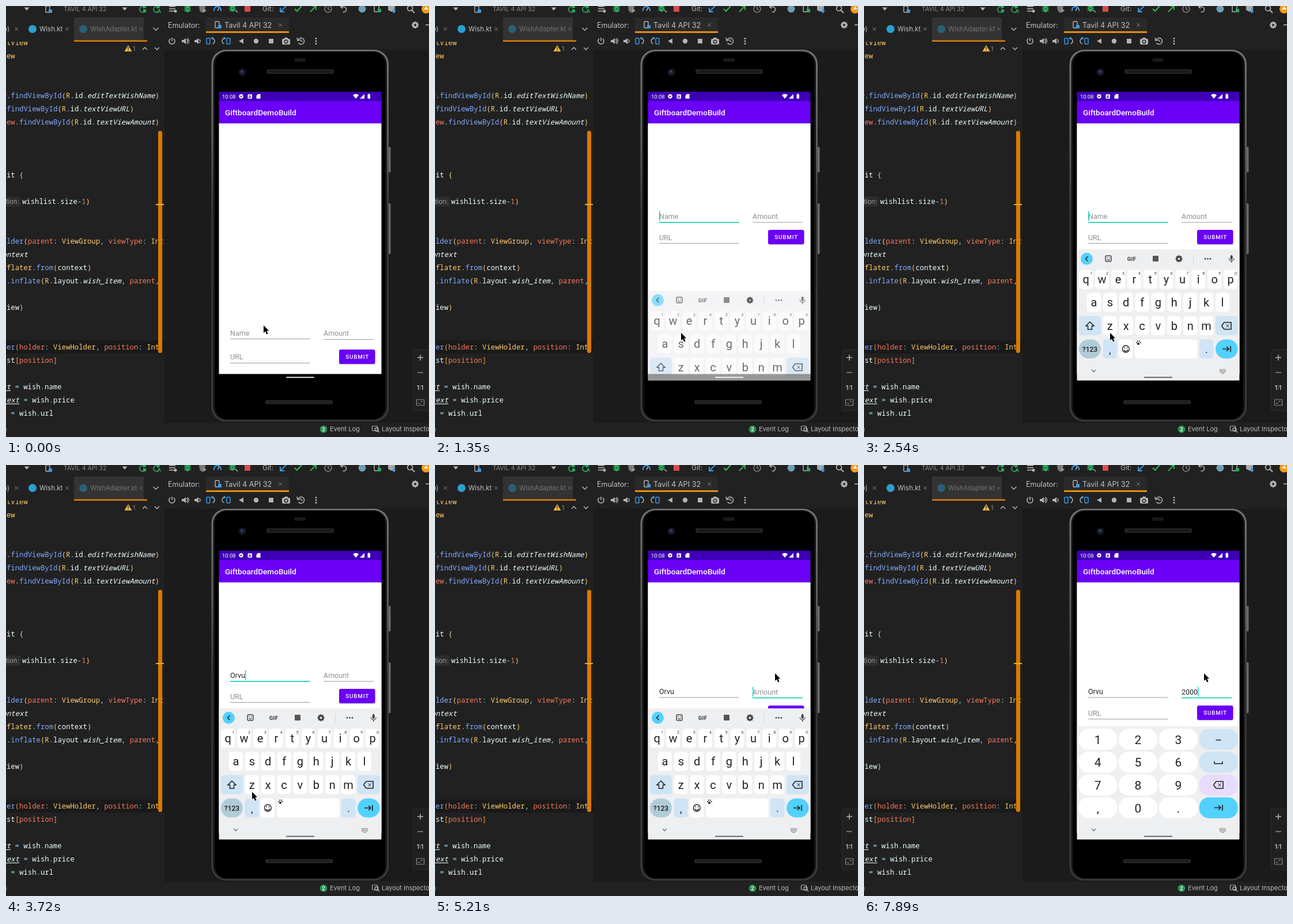
These frames come from a looping animation (734x749 px, 8 s). An HTML page with a canvas:

```html
<!DOCTYPE html>
<html lang="en">
<head>
<meta charset="utf-8">
<title>Wishlist emulator</title>
<style>
html, body { margin: 0; width: 100%; height: 100%; overflow: hidden; background: #1b1b1b; }
canvas { display: block; }
</style>
</head>
<body>
<canvas id="stage" width="734" height="749"></canvas>
<script>
const W = 734, H = 749, LOOP = 8000;
const stage = document.getElementById('stage').getContext('2d');
const backdrop = document.createElement('canvas');
backdrop.width = W;
backdrop.height = H;
let c = backdrop.getContext('2d');

const UI = 'Inter, sans-serif', ROBOTO = 'Roboto, sans-serif', MONO = '"Noto Sans Mono", monospace';
const ORANGE = '#f49810', TEAL = '#16d3bb', PURPLE = '#6a00f6', INK = '#202124';
const GREY = '#b4b4b4', GREEN = '#2eaa5c', BLUE = '#3b9be8';

// ---- drawing helpers ----
function rect(x, y, w, h, fill, r = 0) {
  c.fillStyle = fill;
  c.beginPath();
  c.roundRect(x, y, w, h, r);
  c.fill();
}
function frame(x, y, w, h, color, lw = 1.3, r = 0) {
  c.strokeStyle = color;
  c.lineWidth = lw;
  c.beginPath();
  c.roundRect(x, y, w, h, r);
  c.stroke();
}
function dot(x, y, r, fill) {
  c.fillStyle = fill;
  c.beginPath();
  c.arc(x, y, r, 0, 7);
  c.fill();
}
function arc(x, y, r, color, lw = 1.5, from = 0, to = 2) {
  c.strokeStyle = color;
  c.lineWidth = lw;
  c.beginPath();
  c.arc(x, y, r, from * Math.PI, to * Math.PI);
  c.stroke();
}
function trace(x, y, pts) {
  c.beginPath();
  for (let i = 0; i < pts.length; i += 2) c.lineTo(x + pts[i], y + pts[i + 1]);
}
function line(x, y, pts, color, lw = 1.5) {
  trace(x, y, pts);
  c.strokeStyle = color;
  c.lineWidth = lw;
  c.stroke();
}
function poly(x, y, pts, fill) {
  trace(x, y, pts);
  c.fillStyle = fill;
  c.fill();
}
// Text whose capitals are centred on y
function text(s, x, y, size, color, font = UI, weight = 400, align = 'left', space = 0) {
  c.font = `${weight} ${size}px ${font}`;
  c.letterSpacing = space + 'px';
  c.textAlign = align;
  c.fillStyle = color;
  c.fillText(s, x, y + size * 0.36);
  c.letterSpacing = '0px';
}
const cross = (x, y, color = '#808080', r = 3) => {
  line(x, y, [-r, -r, r, r], color, 1);
  line(x, y, [-r, r, r, -r], color, 1);
};
const chevron = (x, y, color, d = 1, r = 4) => line(x, y, [-r, -d * r / 2, 0, d * r / 2, r, -d * r / 2], color, 1.5);
function gear(x, y, r, color) {
  for (let i = 0; i < 4; i++) {
    const a = i * Math.PI / 4, p = Math.cos(a) * r, q = Math.sin(a) * r;
    line(x, y, [-p, -q, p, q], color, r * 0.45);
  }
  arc(x, y, r * 0.55, color, r * 0.5);
  dot(x, y, r * 0.32, c.gearHole || '#212121');
}
function bug(x, y) {
  for (const d of [-3.5, 0, 3.5]) line(x, y, [-6, d, 6, d], GREEN, 1.4);
  c.fillStyle = GREEN;
  c.beginPath();
  c.ellipse(x, y, 4, 6, 0, 0, 7);
  c.fill();
  line(x, y, [-2, 0, 2, 0], '#212121', 1);
}
function phoneIcon(x, y, color = GREY) {
  frame(x - 4, y - 6, 7, 11, color, 1.4, 1);
  rect(x + 1, y, 6, 6, BLUE, 1);
}

// ---- code editor ----
const COL = { b: '#82aaff', y: '#ffcb6b', w: '#eeffff', i: '#eeffff', u: '#eeffff', r: '#f7785c', p: '#89ddff', g: '#c3e88d', o: '#f0a13c' };
const CH = 7.368;
function code(x, y, ...parts) {
  for (const part of parts) {
    const kind = part[0], s = part.slice(2), w = s.length * CH;
    const style = 'iu'.includes(kind) ? 'italic 400' : 400;
    text(s, x, y, 12.28, COL[kind], MONO, style);
    if (kind === 'u') rect(x, y + 6, w, 1, COL.u);
    x += w;
  }
}
function find(x, y, owner, id) {
  code(x - (owner.length + 1) * CH, y, 'r:' + owner, 'p:.', 'b:findViewById', 'y:(R', 'p:.', 'w:id', 'p:.', 'i:' + id, 'y:)');
}
function drawEditor() {
  rect(0, 0, 275, H, '#212121');
  rect(0, 581, 275, 23, '#1a1a1a');
  c.save();
  c.beginPath();
  c.rect(0, 62, 274, 662);
  c.clip();
  code(-6.4, 64, 'y:xtView');
  code(-6.4, 87, 'y:iew');
  find(8.3, 156, 'w', 'editTextWishName');
  find(1, 179, '', 'textViewURL');
  find(23, 202, 'ew', 'textViewAmount');
  code(1, 294, 'w:it ', 'g:{');
  rect(-5, 331, 31, 18, '#2d2d2d', 4);
  text('tion:', 0, 340, 11, '#9a9a9a');
  code(28, 340, 'w:wishlist', 'p:.', 'w:size', 'p:-', 'r:1', 'y:)');
  code(1, 409, 'b:lder', 'y:(', 'r:parent', 'p:: ', 'y:ViewGroup', 'p:, ', 'r:viewType', 'p:: ', 'y:Int');
  code(-6.4, 432, 'i:ontext');
  code(1, 455, 'y:flater', 'p:.', 'b:from', 'y:(', 'w:context', 'y:)');
  code(1, 478, 'p:.', 'b:inflate', 'y:(R', 'p:.', 'w:layout', 'p:.', 'i:wish_item', 'p:, ', 'r:parent', 'p:,');
  code(-6.4, 524, 'w:View', 'y:)');
  code(1, 593, 'b:er', 'o:(', 'r:holder', 'p:: ', 'y:ViewHolder', 'p:, ', 'r:position', 'p:: ', 'y:Int', 'o:)');
  code(1, 616, 'w:st', 'o:[', 'r:position', 'o:]');
  code(-14, 662, 'u:ext', 'p: = ', 'w:wish', 'p:.', 'w:name');
  code(-6.4, 685, 'u:text', 'p: = ', 'w:wish', 'p:.', 'w:price');
  code(-6.4, 708, 'r:r', 'p: = ', 'w:wish', 'p:.', 'w:url');
  c.restore();
  rect(264, 217, 7, 386, '#d97900', 3);
  rect(260, 344, 14, 2, '#e8b02c');

  // tabs
  text('o)', -5, 40, 12, GREY);
  cross(18, 40);
  dot(46, 40, 7, '#2a9fd0');
  text('Wish.kt', 58, 40, 11.5, '#c4c4c4');
  cross(106, 40);
  rect(118, 20, 121, 40, '#333333');
  rect(118, 59.5, 127, 2.5, '#e07f08');
  dot(134, 40, 7, '#2b5f75');
  text('WishAdapter.kt', 146, 40, 11.3, '#747474');
  cross(234, 40, '#666');
  chevron(260, 40, GREY, 1, 4.5);
  poly(212, 74, [0, -6, 6.5, 5, -6.5, 5], '#f0b83c');
  rect(211.3, 71, 1.5, 4, '#333');
  rect(211.3, 76, 1.5, 1.5, '#333');
  text('1', 220, 74, 11, '#8a8a8a');
  chevron(241, 74, GREY, -1);
  chevron(262, 74, GREY);
}

// ---- IDE chrome ----
function rerun(x, letter) {
  arc(x, 6, 5, GREEN, 1.7, 0.1, 1.6);
  poly(x, 0, [1, -2, 7, 2, 1, 5], GREEN);
  if (letter) text('A', x + 5, 9, 9, GREEN, UI, 600, 'center');
  else rect(x + 1, 6, 5, 5, GREEN);
}
function drawToolbar() {
  rect(0, 0, W, 20, '#212121');
  for (const x of [36, 206]) poly(x, 5, [-4.5, -2.5, 4.5, -2.5, 0, 3], GREY);
  phoneIcon(73, 6);
  text('TAVIL 4 API 32', 100, 5, 10.6, '#8c8c8c');
  rerun(237);
  rerun(261, true);
  for (const d of [0, 4, 8]) rect(283, d, 11, 1.6, GREY);
  dot(294, 9, 2.5, GREY);
  bug(315, 5);
  poly(341, 5, [-6, -6, 5, -6, 4, 3, -1, 7, -5, 3], '#777');
  poly(344, 7, [-2, -3, 4, 1, -2, 5], '#999');
  arc(367, 7, 6, BLUE, 2, 0.9, 2.1);
  line(367, 7, [0, 1, 3, -4], GREY);
  bug(393, 4);
  line(398, 6, [4, 5, 0, 1], GREY);
  rect(414, 0, 10, 10, '#db4b4b');
  text('Git:', 445, 5, 12, GREY);
  line(481, 5, [6, -6, -5, 5], BLUE, 1.8);
  line(481, 5, [-5, -2, -5, 5, 2, 5], BLUE, 1.8);
  line(507, 5, [-6, 0, -2, 4, 6, -5], '#35b94c', 2);
  line(533, 5, [-5, 5, 5, -5], '#35b94c', 1.8);
  line(533, 5, [-2, -5, 5, -5, 5, 2], '#35b94c', 1.8);
  arc(559, 5, 6, '#858585');
  line(559, 5, [0, -4, 0, 0, 3, 2], '#858585');
  arc(586, 6, 4.5, GREY, 1.6, 1.5, 2.6);
  line(584, 1.5, [2, 0, -4, 0], GREY, 1.6);
  line(582, 1.5, [2, -3, -1, 0, 2, 3], GREY);
  dot(618, 5, 6.5, '#6f9db4');
  frame(639, -2, 8, 12, GREY, 1.4, 1);
  rect(645, 5, 6, 6, GREEN);
  poly(669, 4, [-6, -4, 0, -7, 6, -4, 6, 3, 0, 6, -6, 3], '#a8a8a8');
  line(673, 7, [0, -5, 0, 4], BLUE, 2);
  poly(673, 9, [-4, -1, 4, -1, 0, 4], BLUE);
  arc(701, 4, 4.5, GREY, 1.7);
  line(704, 7, [0, 0, 5, 5], GREY, 2);
  dot(729, 5, 8, '#f59a1c');
  poly(729, 5, [0, -4, 4, 1, -4, 1], '#fff');
}
function speaker(x, y, loud) {
  poly(x, y, [-5, -2, -2, -2, 2, -5, 2, 5, -2, 2, -5, 2], GREY);
  arc(x + 2, y, 3, GREY, 1.3, -0.4, 0.4);
  if (loud) arc(x + 2, y, 5.5, GREY, 1.3, -0.35, 0.35);
}
function drawEmulatorPanel() {
  rect(275, 0, W - 275, H, '#1b1b1b');
  rect(275, 20, W - 275, 56, '#212121');
  text('Emulator:', 281, 33, 12.5, '#c0c0c0');
  rect(347, 20, 144, 25, '#2a2a2a');
  rect(347, 44, 144, 2.8, ORANGE);
  phoneIcon(367, 33);
  text('Tavil 4 API 32', 379, 33, 12.7, '#c0c0c0');
  cross(476, 33);
  gear(710, 33, 6, GREY);
  rect(728, 32, 6, 1.6, GREY);

  const y = 61;
  arc(288, y, 5, GREY, 1.6, -0.3, 1.3);
  line(288, y, [0, -6, 0, 0], GREY, 1.6);
  speaker(310, y, true);
  speaker(332, y);
  for (const [x, d] of [[355, 1], [382, -1]]) {
    frame(x - d * 4 - 3, y - 5, 6, 10, BLUE, 1.5, 1);
    arc(x + d * 2, y, 5, GREY, 1.5, d > 0 ? -0.4 : 0.6, d > 0 ? 0.4 : 1.4);
    dot(x + d * 3, y - 5, 2, BLUE);
  }
  poly(408, y, [-4, 0, 4, -4.5, 4, 4.5], GREY);
  dot(434, y, 4.2, GREY);
  rect(456, y - 4, 8, 8, GREY);
  rect(479, y - 4, 14, 10, GREY, 2);
  rect(483, y - 6, 6, 4, GREY, 1);
  arc(486, y + 1, 2.8, '#212121', 1.4);
  arc(512, y, 5.5, GREY, 1.5, -0.9, 0.8);
  line(507, y - 3, [-2, -3, -1, 2, 4, 1], GREY);
  line(512, y, [0, -3, 0, 0, 3, 1], GREY, 1.3);
  for (const d of [-4.5, 0, 4.5]) dot(538, y + d, 1.5, GREY);

  rect(706, 597, 32, 107, '#202020', 3);
  frame(706.5, 597.5, 32, 106, '#2c2c2c', 1, 3);
  line(719, 611, [-5, 0, 5, 0], GREY);
  line(719, 611, [0, -5, 0, 5], GREY);
  line(719, 637, [-5, 0, 5, 0], '#8a8a8a');
  text('1:1', 718.5, 663, 10, '#c8c8c8', UI, 600, 'center');
  frame(712.5, 684, 13, 10, '#8a8a8a', 1.2);
  line(719, 689, [-3, 0, -3, 2, 0, 2], '#8a8a8a', 1);
  line(719, 689, [0, -2, 3, -2, 3, 0], '#8a8a8a', 1);
}
function drawStatusBar() {
  rect(0, 724, W, 25, '#212121');
  text('n', -5, 735, 11, GREY);
  dot(551, 735.5, 6.5, '#23924f');
  text('2', 551, 735.5, 9.5, '#fff', UI, 600, 'center');
  text('Event Log', 562, 735.5, 11, '#bcbcbc');
  frame(635.5, 730, 9, 8, GREY, 1.2, 1);
  arc(643, 736, 3, GREY, 1.3);
  line(645, 738, [0, 0, 3, 3], GREY);
  text('Layout Inspector', 652, 735.5, 11, '#bcbcbc');
}
function drawPhone() {
  rect(662, 245, 5.5, 44, '#6a6a6a', 1.5);
  rect(662, 343, 5.5, 88, '#6a6a6a', 1.5);
  const edge = c.createLinearGradient(0, 76, 0, 722);
  edge.addColorStop(0, '#747474');
  edge.addColorStop(0.25, '#5e5e5e');
  edge.addColorStop(0.45, '#363636');
  edge.addColorStop(1, '#3c3c3c');
  rect(356.5, 76, 307.5, 646, edge, 25);
  rect(359.5, 78.5, 301.5, 641, '#161616', 23);
  rect(362.5, 80, 295.5, 638, '#000', 21);
  rect(500, 91, 20, 6, '#191919', 3);
  rect(452, 110, 117, 8, '#242424', 3);
  rect(456, 112, 109, 4, '#191919', 2);
  dot(410, 115, 6.5, '#16181f');
  dot(410, 115, 3.5, '#1d2545');
  dot(409, 114, 1.3, '#5064a0');
  rect(450, 685, 117, 7, '#282828', 3);
  rect(454, 687, 109, 3, '#1c1c1c', 1);

  rect(369.5, 149, 282, 16, '#3d00b4');
  rect(369.5, 165, 282, 39, PURPLE);
  rect(369.5, 204, 282, 435.5, '#fff');
  text('10:08', 375, 157.5, 9.5, '#fff', ROBOTO);
  c.gearHole = '#3d00b4';
  gear(408, 157, 4, '#fff');
  c.gearHole = '';
  rect(419.5, 153.5, 7.5, 7.5, '#fff', 1);
  text('A', 423.2, 157.3, 7, '#3d00b4', ROBOTO, 700, 'center');
  poly(438, 157, [-1, -4, 3.5, -4, 3.5, 4, -3.5, 4, -3.5, -1], '#fff');
  poly(607, 157, [0, 4, -5, -2, -2, -4, 2, -4, 5, -2], '#fff');
  poly(618, 157, [4, -4, 4, 4, -4, 4], '#fff');
  rect(627.5, 153.5, 4.5, 7.5, '#fff', 0.8);
  rect(628.7, 152.5, 2, 2, '#fff');
  text('GiftboardDemoBuild', 380, 185, 13.6, '#fff', ROBOTO, 500);
}

// ---- app screen ----
function field(s, hint, x, y, w, lineY, focused, caret) {
  text(s || hint, x, y, 12.5, s ? '#222' : '#8f8f8f', ROBOTO);
  const end = s ? c.measureText(s).width : 0;
  if (focused) rect(x, lineY - 0.8, w, 1.7, TEAL);
  else rect(x, lineY - 0.5, w, 1, '#9a9a9a');
  if (caret) rect(x + end, y - 8.5, 1.5, 17, TEAL);
}
function drawForm(s) {
  const [ny, nl, al, uy, ul, by] = {
    low: [568, 578.5, 579.5, 609.5, 620.5, 597],
    high: [365, 376, 376, 402, 412.5, 389],
    mid: [393.5, 404, 404.5, 431, 441.5, 418]
  }[s.layout];
  field(s.name, 'Name', 389, ny, 138.5, nl, s.focus === 'name', s.focus === 'name' && s.caret);
  field(s.amount, 'Amount', 551, ny + 0.5, 87, al, s.focus === 'amount', s.focus === 'amount' && s.caret);
  field('', 'URL', 389, uy, 138.5, ul);
  rect(578, by + 1, 62.5, 25.2, '#c9c9c9', 3);
  rect(578, by, 62.5, 25, PURPLE, 3);
  text('SUBMIT', 609.7, by + 12.7, 9.8, '#fff', ROBOTO, 500, 'center', 0.85);
}

// ---- keyboards ----
const PALE = '#cfe4f5', CYAN = '#52d1ff', KEYBG = '#eeeff1';
const label = (s, x, y, size = 20, weight = 400) => text(s, x, y, size, INK, ROBOTO, weight, 'center');
function letterRow(letters, x, y, numbered) {
  [...letters].forEach((ch, i) => {
    const cx = x + i * 27.87;
    rect(cx - 12, y - 16.5, 24, 33, '#fff', 5);
    label(ch, cx, y);
    if (numbered) text(String((i + 1) % 10), cx + 9, y - 10.5, 7.5, '#444', ROBOTO, 400, 'center');
  });
}
function backspace(x, y) {
  line(x, y, [-8.5, 0, -4, -6, 8, -6, 8, 6, -4, 6, -8.5, 0], INK, 1.6);
  cross(x + 2, y, INK, 2.8);
}
function nextArrow(x, y) {
  line(x, y, [-7, 0, 4, 0], INK, 1.7);
  line(x, y, [0, -4, 4, 0, 0, 4], INK, 1.7);
  line(x, y, [7, -5, 7, 5], INK, 1.7);
}
function bottomBar() {
  chevron(398.5, 634, '#777', 1, 3.5);
  for (let i = 0; i < 3; i++)
    for (let j = 0; j < 5; j++) rect(617 + j * 2.3, 631 + i * 2.3, 1.4, 1.4, '#777');
  rect(620, 638, 5, 1, '#777');
}
function drawLetters() {
  rect(369.5, 423, 282, 228, KEYBG);
  dot(386.5, 439.3, 10.5, CYAN);
  line(386.5, 439.3, [2, -4, -2, 0, 2, 4], INK, 1.5);
  frame(419, 434, 10, 10, '#444', 1.5, 2);
  arc(424, 439, 2.5, '#444', 1.2, 0.1, 0.9);
  rect(421.5, 436.5, 1.5, 1.5, '#444');
  rect(425.5, 436.5, 1.5, 1.5, '#444');
  text('GIF', 464.5, 439.3, 9.5, '#333', ROBOTO, 700, 'center', 0.4);
  rect(501, 434, 10, 10, '#555', 1);
  c.gearHole = KEYBG;
  gear(546.5, 439.3, 6, '#444');
  c.gearHole = '';
  rect(571, 432, 1, 15, '#d2d4d6');
  for (const x of [592, 596.5, 601]) dot(x, 439.3, 1.4, '#444');
  rect(635.7, 433, 4, 8, '#444', 2);
  arc(637.7, 438.5, 4.4, '#444', 1.3, 0, 1);
  rect(637, 443, 1.4, 3, '#444');

  letterRow('qwertyuiop', 385.2, 475, true);
  letterRow('asdfghjkl', 399, 515);
  letterRow('zxcvbnm', 426.8, 555.5);
  rect(373, 539, 38, 33, PALE, 5);
  line(392, 556, [0, -7, 7, 0, 3.5, 0, 3.5, 6, -3.5, 6, -3.5, 0, -7, 0, 0, -7, 1, -6], INK, 1.5);
  rect(610, 539, 38.5, 33, PALE, 5);
  backspace(629, 555.8);

  rect(373, 579.5, 38, 33, '#b0ccd9', 16.5);
  label('?123', 392, 596.5, 12, 500);
  rect(414.7, 579.5, 24, 33, PALE, 5);
  label(',', 426.7, 598, 18);
  rect(442.3, 579.5, 24, 33, '#fff', 5);
  arc(454.3, 596, 6, INK, 1.4);
  arc(454.3, 596.7, 3.3, INK, 1.4, 0.05, 0.95);
  dot(452, 594, 1, INK);
  dot(456.6, 594, 1, INK);
  rect(470, 579.5, 108.5, 33, '#fff', 5);
  dot(476, 587, 2.1, INK);
  for (const [x, y] of [[-3, -1], [-1, -3.5], [2, -3.5], [3.7, -1]]) dot(476 + x, 586 + y, 1.1, INK);
  rect(582, 579.5, 24.5, 33, PALE, 5);
  label('.', 594.3, 597, 18);
  rect(610, 579.5, 38.5, 33, CYAN, 16.5);
  nextArrow(629, 596);
  bottomBar();
}
function drawDigits() {
  rect(369.5, 454, 282, 197, KEYBG);
  const side = [PALE, PALE, '#e7dcfd', CYAN];
  ['123', '456', '789', ',0.'].forEach((row, i) => {
    const y = 476.7 + i * 39.7;
    for (let j = 0; j < 4; j++) {
      const x = 372.3 + j * 69.8;
      rect(x, y - 18.3, 67, 36.6, j < 3 ? '#fff' : side[i], 17);
      if (j < 3) label(row[j], x + 33.4, y + 0.5, 21);
    }
  });
  line(615, 478, [-4.5, 0, 4.5, 0], INK, 1.6);
  line(615, 516, [-7, -1, -7, 3, 7, 3, 7, -1], INK, 1.6);
  backspace(615, 556);
  nextArrow(615, 595.5);
  bottomBar();
}

// ---- timeline: each row holds from its time until the next ----
const held = (rows, t) => rows.reduce((last, row) => row[0] <= t ? row : last)[1];

const MOUSE = [
  [0, [447, 555]], [300, [445, 556]], [450, [440, 560]], [600, [434, 564]], [750, [429, 567]], [900, [427, 568]],
  [4020, [446, 546]], [4170, [510, 470]], [4320, [620, 382]], [4470, [608, 371]], [4620, [596, 364]], [4770, [590, 362]]
];
const TYPED_NAME = [[0, ''], [3130, 'O'], [3280, 'Or'], [3430, 'Orv'], [3720, 'Orvu']];
const TYPED_AMOUNT = [[0, ''], [5960, '2'], [6250, '20'], [6400, '200'], [6850, '2000']];
const FOCUS = [[0, ''], [900, 'name'], [5060, 'amount']];
const LAYOUT = [[0, 'low'], [1350, 'high'], [5210, 'mid']];
const KEYS = [[0, ''], [1350, 'letters'], [5360, 'digits']];
const CARET = [[0, 1], [1800, 0], [2240, 1], [2830, 0], [3130, 1], [4020, 0], [4770, 1], [5660, 0], [5960, 1], [7290, 0], [7890, 1]];
const SLIDE = [[0, 72], [1500, 30], [1650, 11], [1800, 3], [1950, 0]];
const HANDLE = [[0, '#fff'], [1500, '#f7f7f7'], [2240, '#8a8a8a'], [2540, '#55565a']];

function drawMouse([x, y]) {
  c.lineJoin = 'round';
  const arrow = [0, 0, 0, 13, 3, 10.5, 5.2, 15.5, 7.6, 14.4, 5.4, 9.6, 9.2, 9.3, 0, 0, 0, 3];
  line(x, y, arrow, '#fff', 2);
  poly(x, y, arrow, '#000');
  c.lineJoin = 'miter';
}
function draw(t) {
  c.drawImage(backdrop, 0, 0);
  const keys = held(KEYS, t);
  c.save();
  c.beginPath();
  c.rect(369.5, 204, 282, 446.5);
  c.clip();
  if (keys) rect(369.5, 204, 282, 447, '#fff');
  drawForm({
    layout: held(LAYOUT, t), focus: held(FOCUS, t), caret: held(CARET, t),
    name: held(TYPED_NAME, t), amount: held(TYPED_AMOUNT, t)
  });
  if (keys === 'letters') {
    const dy = held(SLIDE, t);
    c.save();
    c.globalAlpha = 1 - dy / 210;
    c.translate(0, dy);
    drawLetters();
    c.restore();
    if (dy > 50) rect(369.5, 639.5, 282, 12, 'rgba(90,90,90,.6)');
  } else if (keys) {
    drawDigits();
  }
  c.restore();
  rect(486, 644.5, 49, 1.8, held(HANDLE, t), 1);
  drawMouse(held(MOUSE, t));
}

drawEmulatorPanel();
drawEditor();
drawToolbar();
drawPhone();
drawStatusBar();
c = stage;

const start = performance.now();
function tick() {
  draw((performance.now() - start) % LOOP);
  requestAnimationFrame(tick);
}
tick();
</script>
</body>
</html>
```
